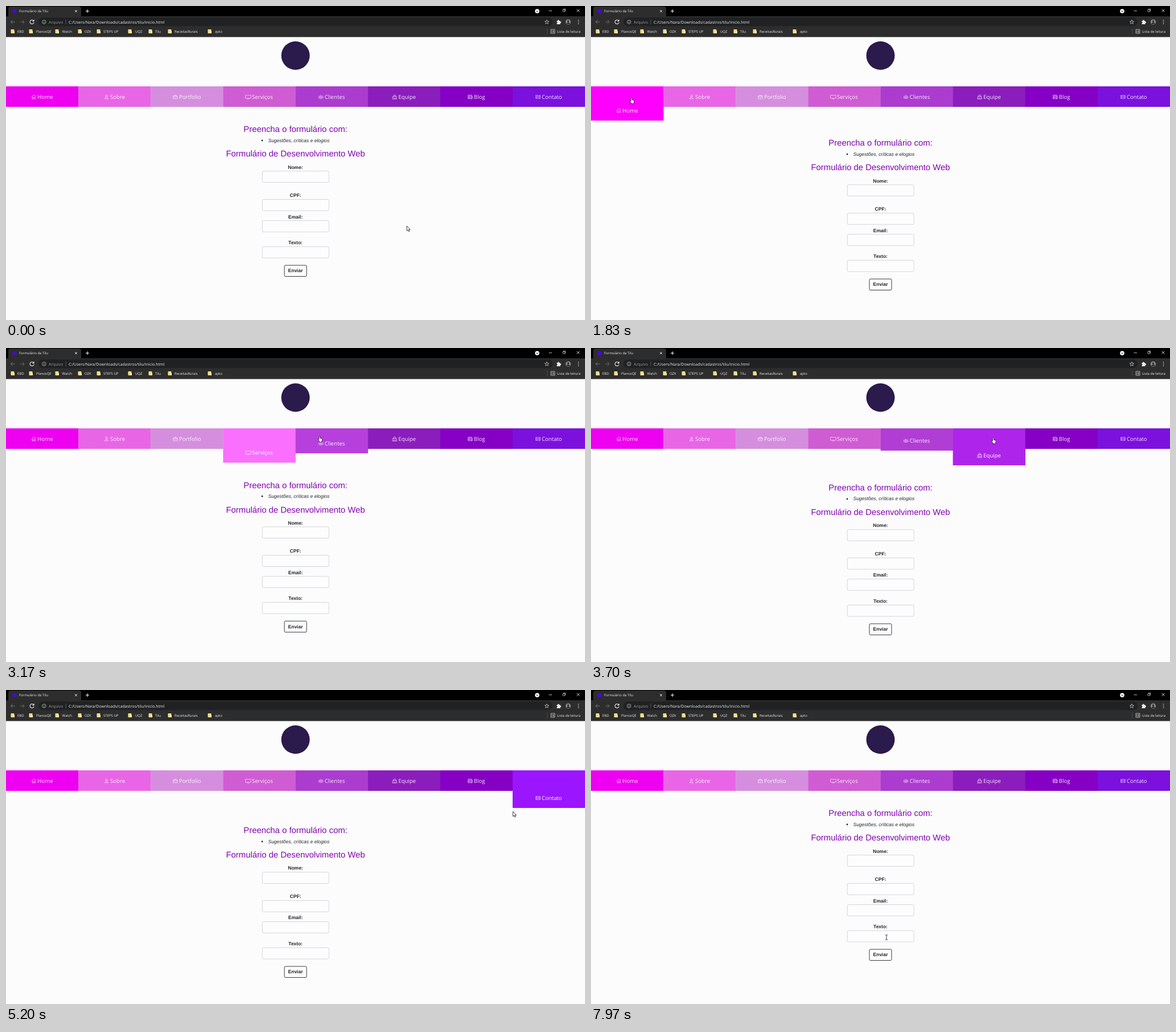
An HTML page with a canvas for the animation above (8 s loop, 1017 px wide and 551 px high).

```html
<!DOCTYPE html>
<html lang="pt-BR">
<head>
<meta charset="utf-8">
<title>Formulário</title>
<style>
  html, body { margin: 0; width: 100%; height: 100%; overflow: hidden; background: #fcfcfc; }
  canvas { display: block; width: 1017px; height: 551px; }
</style>
</head>
<body>
<canvas id="stage"></canvas>
<script>
const W = 1017, H = 551, LOOP = 8000;
const canvas = document.getElementById('stage');
const ctx = canvas.getContext('2d');
const dpr = window.devicePixelRatio || 1;
canvas.width = Math.round(W * dpr);
canvas.height = Math.round(H * dpr);

const UI = '"Open Sans", "Noto Sans", sans-serif';
const SANS = '"Liberation Sans", Arial, sans-serif';
const INK = '#212529', PURPLE = '#8204b2';

const NAV_TOP = 141, NAV_H = 36, DROP = 32, DROP_MS = 400, ITEM_W = W / 8;

// Label, colour, hover start, icon on a 16-unit grid
const items = [
  ['Home', [238, 0, 241], 1650, 'M1 8L8 1.5L15 8M3 7V14.5H6.5V10H9.5V14.5H13V7M12.5 5V2.5'],
  ['Sobre', [232, 102, 230], 1920, 'M8 2A3 3 0 1 1 8 8A3 3 0 1 1 8 2M6 8L5.5 11L2 14H14L10.5 11L10 8'],
  ['Portfolio', [213, 142, 222], 2394, 'M1 4.5H15V14H1ZM5.5 4.5V2.5H10.5V4.5M1 7L8 9L15 7'],
  ['Serviços', [208, 92, 211], 2690, 'M-1 2.5H17V12.5H-1ZM4 14.5H12'],
  ['Clientes', [172, 60, 207], 3100, 'M8 3A2.5 2.5 0 1 1 8 8A2.5 2.5 0 1 1 8 3M3.5 13Q4 9 8 9T12.5 13ZM3.5 5A1.8 1.8 0 1 0 4 8M12.5 5A1.8 1.8 0 1 1 12 8M0 12Q0 9 3 9M16 12Q16 9 13 9'],
  ['Equipe', [140, 29, 189], 3450, 'M2 6H14L15 15H1ZM5 8V4A3 3 0 0 1 11 4V8M3 12H13'],
  ['Blog', [133, 0, 196], 3900, 'M1 2H13V14H1ZM13 5H15V14H12M3 5H11M3 8H6V11H3ZM8 8H11M8 11H11'],
  ['Contato', [124, 17, 222], 4490, 'M1 3H15V13H1ZM1 4L8 9L15 4M1 12L6 8M15 12L10 8']
].map(([label, rgb, start, icon]) => ({ label, rgb, start, icon: new Path2D(icon) }));
const NAV_LEAVE = 5170;
items.forEach((it, i) => { it.end = i < 7 ? items[i + 1].start : NAV_LEAVE; });

// Pointer hotspot: time, x, y
const route = [
  [0, 704, 386], [30, 704, 386], [420, 615, 477], [830, 500, 429],
  [1250, 285, 290], [1650, 72, 176], [1830, 70.5, 160.5], [1920, 127, 157],
  [2394, 254, 151], [2530, 292, 150], [2690, 381, 150], [3100, 508, 153],
  [3170, 550.5, 154], [3450, 635, 157], [3900, 763, 157], [4200, 805, 157],
  [4485, 890, 153.5], [4500, 901.5, 153], [4900, 945, 158], [5070, 945, 158],
  [5170, 908, 209], [5870, 510, 306], [6000, 510, 311], [6700, 516, 431],
  [6740, 516, 431], [6980, 515, 456], [7170, 515, 466], [7740, 515, 466],
  [7970, 519, 434], [8000, 519, 434]
];
const BTN_IN = 6980, BTN_OUT = 7810, BTN_MS = 150;

const bookmarks = [
  [9, 20, 'EBD'], [41, 53, 'PlanosQE'], [87, 98.5, 'Watch'], [127, 138, 'OZK'],
  [160, 171, 'STEPS UP'], [215, 227, 'UQZ'], [251, 262, 'Tilu'],
  [285, 296, 'ReceitasRurais'], [355, 367, 'apto']
];
const fields = [
  ['Nome:', 285.5, 289.5], ['CPF:', 335.3, 339.3],
  ['Email:', 372.5, 376.4], ['Texto:', 418, 422]
];

const clamp = v => Math.min(1, Math.max(0, v));

// CSS "ease": cubic-bezier(.25, .1, .25, 1)
function ease(x) {
  x = clamp(x);
  if (x === 0 || x === 1) return x;
  const curve = (s, a, b) => 3 * s * (1 - s) * (1 - s) * a + 3 * s * s * (1 - s) * b + s * s * s;
  let lo = 0, hi = 1;
  for (let i = 0; i < 24; i++) {
    const mid = (lo + hi) / 2;
    if (curve(mid, .25, .25) < x) lo = mid; else hi = mid;
  }
  return curve(lo, .1, 1);
}
const pulse = (t, start, end, ms) => ease((t - start) / ms) - ease((t - end) / ms);

function pointerAt(t) {
  let i = 1;
  while (i < route.length - 1 && route[i][0] < t) i++;
  const [t0, x0, y0] = route[i - 1], [t1, x1, y1] = route[i];
  const k = clamp((t - t0) / (t1 - t0));
  return [x0 + (x1 - x0) * k, y0 + (y1 - y0) * k];
}

function text(str, x, y, font, color, align = 'left') {
  ctx.font = font;
  ctx.fillStyle = color;
  ctx.textAlign = align;
  ctx.fillText(str, x, y);
}
function rect(x, y, w, h, color) {
  ctx.fillStyle = color;
  ctx.fillRect(x, y, w, h);
}
function round(x, y, w, h, r, fill, stroke, width = 0.7) {
  ctx.beginPath();
  ctx.roundRect(x, y, w, h, r);
  if (fill) { ctx.fillStyle = fill; ctx.fill(); }
  if (stroke) { ctx.strokeStyle = stroke; ctx.lineWidth = width; ctx.stroke(); }
}
function disc(x, y, r, color) {
  ctx.beginPath();
  ctx.arc(x, y, r, 0, 7);
  ctx.fillStyle = color;
  ctx.fill();
}
function line(d, color, width = 0.9) {
  ctx.strokeStyle = color;
  ctx.lineWidth = width;
  ctx.stroke(new Path2D(d));
}

function drawTabs() {
  rect(0, 0, W, 18, '#000');
  round(4, 1, 128, 22, 4, '#2d2d2e');
  disc(15, 9, 3.6, '#4a08d8');
  text('Formulário da Tilu', 23, 11.2, `6px ${UI}`, '#eee');
  line('M121 7L125 11M125 7L121 11', '#eee');
  line('M140 9H146M143 6V12', '#fff', 1);
  disc(933, 9, 3.8, '#fff');
  line('M931.3 8.2L933 10L934.7 8.2', '#000');
  line('M953.5 8.5H959', '#ddd', 0.8);
  line('M978 6.5H981.5V10H978ZM979.3 6.5V5.2H982.8V8.7H981.5', '#ddd', 0.7);
  line('M1002.5 5.5L1007.5 10.5M1007.5 5.5L1002.5 10.5', '#eee', 0.8);
}

function drawToolbar() {
  rect(0, 18, W, 36.5, '#2d2d2e');
  round(57, 20.3, 903, 15, 7.5, '#202122');
  line('M15.5 28H8.5M11.5 24.8L8.3 28L11.5 31.2', '#838383');
  line('M25 28H32M29 24.8L32.2 28L29 31.2', '#737373');
  line('M48.5 26A3.5 3.5 0 1 0 49 29M49 24V26.7H46.3', '#eee', 1.1);
  ctx.beginPath();
  ctx.arc(66.8, 28, 3.3, 0, 7);
  ctx.strokeStyle = '#c4c4c4';
  ctx.lineWidth = 0.8;
  ctx.stroke();
  line('M66.8 27.3V30M66.8 25.8V26.6', '#c4c4c4', 0.8);
  text('Arquivo', 75, 30.5, `7px ${UI}`, '#9a9a9a');
  line('M105 24V32', '#6a6a6a', 0.7);
  text('C:/Users/Nara/Downloads/cadastros/tilu/inicio.html', 110, 30.5, `7px ${UI}`, '#ededed');

  ctx.beginPath();
  for (let i = 0; i < 10; i++) {
    const a = -Math.PI / 2 + i * Math.PI / 5, r = i % 2 ? 1.6 : 3.9;
    ctx.lineTo(950 + r * Math.cos(a), 28.2 + r * Math.sin(a));
  }
  ctx.closePath();
  ctx.strokeStyle = '#ddd';
  ctx.lineWidth = 0.7;
  ctx.stroke();

  rect(967.5, 26, 6, 6, '#eee');
  disc(970.3, 25.8, 1.3, '#eee');
  disc(973.8, 28.8, 1.3, '#eee');
  disc(967.7, 29, 0.9, '#2d2d2e');
  disc(987.5, 28, 4.6, '#8b8b8b');
  disc(987.5, 26.8, 1.6, '#222');
  ctx.beginPath();
  ctx.arc(987.5, 31.6, 2.8, Math.PI, 0);
  ctx.fill();
  for (const y of [25, 28, 31]) disc(1005.5, y, 0.8, '#eee');

  for (const [iconX, x, label] of bookmarks) {
    round(iconX - 0.5, 41, 6, 7, 0.7, '#f8dd83');
    rect(iconX + 3.8, 44, 2.2, 4, '#fff0b5');
    text(label, x, 46.5, `6px ${UI}`, '#eee');
  }
  line('M950.5 39.5V49.5', '#555', 0.7);
  line('M957 41H964V48H957ZM958 43H959.3M960.3 43H963M958 44.6H959.3M960.3 44.6H963M958 46.2H959.3M960.3 46.2H963', '#ddd', 0.7);
  text('Lista de leitura', 968, 46.5, `6px ${UI}`, '#eee');
}

function drawNav(t) {
  let tallest = 0;
  items.forEach((it, i) => {
    const k = pulse(t, it.start, it.end, DROP_MS);
    const drop = k * DROP;
    tallest = Math.max(tallest, drop);
    const rgb = it.rgb.map(v => Math.min(255, Math.round(v * (1 + 0.27 * k))));
    rect(i * ITEM_W, NAV_TOP, ITEM_W + (i < 7 ? 0.3 : 0), NAV_H + drop, `rgb(${rgb})`);

    const color = `rgba(255,255,255,${0.88 + 0.12 * k})`;
    ctx.font = `9.6px ${UI}`;
    const left = (i + 0.5) * ITEM_W - (ctx.measureText(it.label).width + 10.8) / 2;
    text(it.label, left + 10.8, 163.2 + drop, `9.6px ${UI}`, color);
    ctx.save();
    ctx.translate(left, 155.3 + drop);
    ctx.scale(0.53, 0.53);
    ctx.strokeStyle = color;
    ctx.lineWidth = 1.25;
    ctx.stroke(it.icon);
    ctx.restore();
  });
  return tallest;
}

function drawForm(t, shift) {
  const mid = W / 2;
  ctx.save();
  ctx.translate(0, shift);
  text('Preencha o formulário com:', mid, 221.4, `14.85px ${SANS}`, PURPLE, 'center');
  disc(450, 236, 1.4, INK);
  text('Sugestões, críticas e elogios', 460.5, 238.6, `italic 8.48px ${SANS}`, INK);
  text('Formulário de Desenvolvimento Web', mid, 264.4, `14.85px ${SANS}`, PURPLE, 'center');
  for (const [label, base, top] of fields) {
    text(label, mid, base, `bold 8.48px ${SANS}`, INK, 'center');
    round(450.2, top + 0.2, 117, 19.8, 2, '#fdfdfd', '#cbcbdb', 0.8);
  }
  const k = pulse(t, BTN_IN, BTN_OUT, BTN_MS);
  round(489, 455, 39, 19.5, 2, `rgba(33,37,41,${k})`, INK, 0.9);
  const tone = [33, 37, 41].map(v => Math.round(v + (255 - v) * k));
  text('Enviar', mid, 467.4, `bold 8.48px ${SANS}`, `rgb(${tone})`, 'center');
  ctx.restore();
}

const arrow = new Path2D('M0 0V8.6L2 6.8L3.4 9.8L4.8 9.2L3.5 6.2H6Z');
const hand = new Path2D('M-1 1Q0 -0.6 1 1V4.2L4 5Q5 5.3 4.8 6.5L4 9.3V11H-0.3V9.8L-3 6.5Q-3.2 5.2 -2 5.6L-1 6.5Z');
const beam = new Path2D('M-2 -4.2H-0.5L0 -3.7L0.5 -4.2H2M0 -3.7V3.7M-2 4.2H-0.5L0 3.7L0.5 4.2H2');

function drawPointer(t) {
  const [x, y] = pointerAt(t);
  const onLink = t >= items[0].start && t < NAV_LEAVE || t >= BTN_IN && t < BTN_OUT;
  const onField = x > 450 && x < 568 && y > 289 && y < 443;
  ctx.save();
  ctx.translate(x, y);
  if (onField && !onLink) {
    ctx.strokeStyle = '#222';
    ctx.lineWidth = 0.9;
    ctx.stroke(beam);
  } else {
    const shape = onLink ? hand : arrow;
    ctx.fillStyle = '#fff';
    ctx.fill(shape);
    ctx.strokeStyle = '#111';
    ctx.lineWidth = 0.8;
    ctx.lineJoin = 'round';
    ctx.stroke(shape);
  }
  ctx.restore();
}

function draw(t) {
  ctx.setTransform(dpr, 0, 0, dpr, 0, 0);
  ctx.textRendering = 'geometricPrecision';
  rect(0, 0, W, H, '#fcfcfc');
  drawTabs();
  drawToolbar();
  disc(508.5, 87, 25, '#2b1a4c');
  drawForm(t, drawNav(t));
  drawPointer(t);
}

const began = performance.now();
function tick() {
  draw((performance.now() - began) % LOOP);
  requestAnimationFrame(tick);
}
tick();
</script>
</body>
</html>
```
